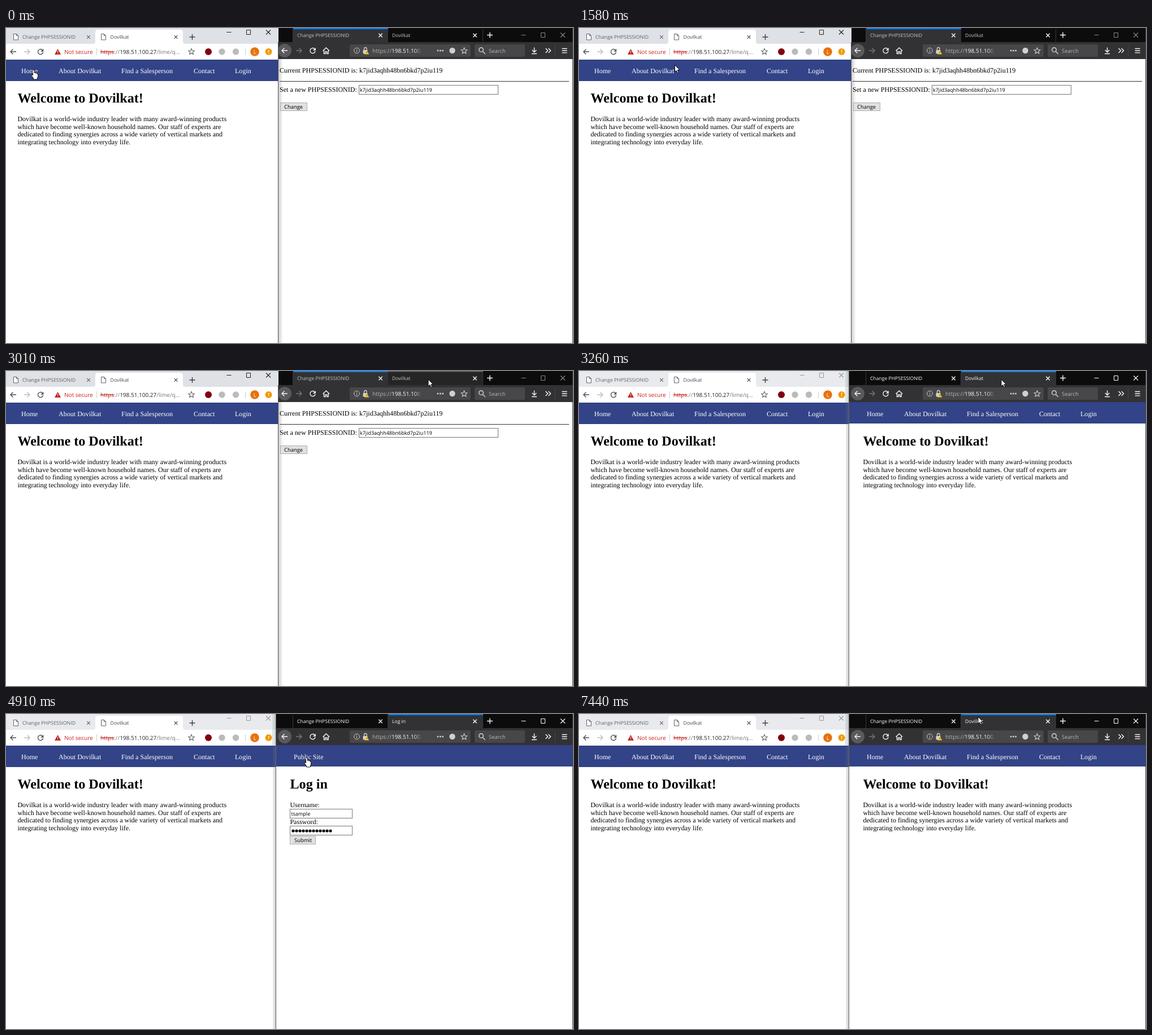
Recreate the animation shown at these times as an HTML page. Size 1003 px wide and 558 px high, loop 8 s.

```html
<!DOCTYPE html>
<html lang="en">
<head>
<meta charset="utf-8">
<title>Two browser windows</title>
<style>
html, body { margin: 0; width: 100%; height: 100%; overflow: hidden; background: #fff; }
svg { display: block; width: 100%; height: 100%; }
text { white-space: pre; text-rendering: geometricPrecision; }
.ui { font-family: "Open Sans", "Noto Sans", sans-serif; }
.serif { font-family: "Liberation Serif", "Times New Roman", serif; }
.sans { font-family: "Liberation Sans", Arial, sans-serif; }
</style>
</head>
<body>
<svg viewBox="0 0 1003 558" xmlns="http://www.w3.org/2000/svg">
  <defs>
    <linearGradient id="shadeR"><stop stop-color="#777" stop-opacity=".4"/><stop offset="1" stop-color="#999" stop-opacity="0"/></linearGradient>
    <linearGradient id="shadeL"><stop stop-color="#777" stop-opacity=".12"/><stop offset="1" stop-color="#666" stop-opacity=".38"/></linearGradient>
    <linearGradient id="fade"><stop stop-color="#474749" stop-opacity="0"/><stop offset="1" stop-color="#474749"/></linearGradient>
  </defs>
  <g id="scene"></g>
  <g id="cursor" fill="#fff" stroke="#000" stroke-width=".9" stroke-linejoin="round">
    <path id="arrow" d="M0 0V12L2.8 9.5 4.8 14 6.7 13.2 4.8 8.8H8.6Z"/>
    <path id="hand" d="M-1.5 1.2Q0-1 1.5 1.2V6Q3 0 3.4 6.4 5 0 5.4 7 7.4 6 7.6 8.4V12L6.4 15V17H-.6V15L-4 10.2Q-4.4 8-2.8 8.6L-1.5 10Z"/>
  </g>
</svg>
<script>
const LOOP = 8000, BRAND = 'Dovilkat', SESSION = 'k7jid3aqhh48bn6bkd7p2iu119';
const TAB = 'Change PHPSESSIONID', BLUE = '#324387';
const $ = id => document.getElementById(id);

// Bursts of screen updates: start, end, number of steps
const BURSTS = [[160, 1120, 8], [1270, 2210, 8], [2360, 2360, 1], [2640, 3680, 9], [3800, 4790, 8],
  [4910, 4910, 1], [5340, 6300, 8], [6690, 7020, 3], [7300, 7440, 2]];

// Cursor path: time, x, y
const PATH = [[0, 49, 74], [159, 49, 74], [570, 404, 76], [846, 408, 77], [970, 330, 80], [1120, 56, 76],
  [1400, 49, 76], [1940, 785, 13], [2210, 746, 13], [2360, 747, 15], [3160, 747, 15], [3680, 885, 70],
  [3800, 897, 76], [3941, 897, 76], [4222, 532, 86], [4365, 532, 85], [4640, 532, 77], [5750, 532, 77],
  [6300, 648, 88], [6690, 668, 78], [6855, 738, 40], [7020, 704, 2], [7300, 704, 2], [7440, 706, 5], [LOOP, 706, 5]];
const HAND = [[0, 290], [570, 965], [1115, 1450], [3800, 4000], [4640, 5800]];

const rect = (x, y, w, h, fill, more = '') => `<rect x="${x}" y="${y}" width="${w}" height="${h}" fill="${fill}" ${more}/>`;
const box = (x, y, w, h, fill, stroke) => rect(x + .5, y + .5, w - 1, h - 1, fill, `stroke="${stroke}"`);
const dot = (x, y, r, fill) => `<circle cx="${x}" cy="${y}" r="${r}" fill="${fill}"/>`;
const line = (d, stroke, w = 1, fill = 'none') => `<path d="${d}" stroke="${stroke}" stroke-width="${w}" fill="${fill}"/>`;
const text = (x, y, s, size, fill = '#000', cls = 'ui', more = '') =>
  `<text x="${x}" y="${y}" font-size="${size}" fill="${fill}" class="${cls}" ${more}>${s}</text>`;
const serif = (x, y, s, fill) => text(x, y, s, 12.06, fill, 'serif');
const heading = (x, s) => text(x, 132, s, 24.12, '#000', 'serif', 'font-weight="700"');

const cross = (x, y, r, c, w = 1.1) => line(`M${x - r} ${y - r}l${2 * r} ${2 * r}m0 ${-2 * r}l${-2 * r} ${2 * r}`, c, w);
const plus = (x, y, c) => line(`M${x - 5} ${y}h10M${x} ${y - 5}v10`, c, 1.4);
const back = (x, y, c) => line(`M${x + 5} ${y}h-10m4.5-4.5l-4.5 4.5 4.5 4.5`, c, 1.4);
const next = (x, y, c) => line(`M${x - 5} ${y}h10m-4.5-4.5l4.5 4.5-4.5 4.5`, c, 1.4);
const reload = (x, y, c) => line(`M${x + 3.2} ${y - 3.2}A4.6 4.6 0 1 0 ${x + 4.6} ${y + 1}`, c, 1.4) +
  `<path d="M${x + 5.3} ${y - 5.3}v5h-5z" fill="${c}"/>`;
const star = (x, y, c) => {
  let d = '';
  for (let i = 0; i < 10; i++) {
    const r = i % 2 ? 2.5 : 5.6, a = i * Math.PI / 5;
    d += `${i ? 'L' : 'M'}${(x + r * Math.sin(a)).toFixed(1)} ${(y - r * Math.cos(a)).toFixed(1)}`;
  }
  return line(d + 'Z', c, 1.1);
};
const sheet = x => line(`M${x} 10.5h5l3 3v7.5h-8zM${x + 5} 10.5v3h3`, '#5f6368', 1, '#fff');
const windowButtons = (x, y, c) => line(`M${x} ${y}h8M${x + 35} ${y - 4}h7v8h-7z`, c) + cross(x + 73.5, y, 4, c);

function homePage(x) {
  const nav = [[27, 'Home'], [93, 'About ' + BRAND], [204, 'Find a Salesperson'], [332, 'Contact'], [405, 'Login']];
  const copy = [BRAND + ' is a world-wide industry leader with many award-winning products',
    'which have become well-known household names. Our staff of experts are',
    'dedicated to finding synergies across a wide variety of vertical markets and',
    'integrating technology into everyday life.'];
  return nav.map(([dx, s]) => serif(x + dx, 80, s, '#fff')).join('') +
    heading(x + 20.5, `Welcome to ${BRAND}!`) +
    copy.map((s, i) => serif(x + 20.4, 165 + Math.round(i * 13.6), s)).join('');
}

function loginPage(x, filled) {
  const left = x + 20, edge = filled ? '#777' : '#a9a9a9';
  let s = serif(x + 27, 80, 'Public Site', '#fff') + heading(left + .5, 'Log in') +
    serif(left + .4, 165, 'Username:') + serif(left + .4, 195, 'Password:');
  if (!filled) return s + box(left, 168, 131, 16, '#fff', edge) + box(left, 197, 131, 16, '#fff', edge) +
    box(left, 213, 44, 16, '#e9e9e9', '#a0a0a0') + text(left + 6.5, 225, 'Submit', 10, '#000', 'sans');
  s += box(left, 168, 111, 17, '#fff', edge) + box(left, 198, 111, 17, '#fff', edge) +
    text(left + 2.5, 180, 'tsample', 9) + box(left, 216, 46, 15, '#e1e1e1', '#adadad') +
    text(left + 8, 227, 'Submit', 9.4);
  for (let i = 0; i < 12; i++) s += dot(left + 6 + i * 6, 207, 2.6, '#000');
  return s;
}

function sessionPage() {
  return serif(484, 79, 'Current PHPSESSIONID is: ' + SESSION) + rect(484, 94, 512, 1, '#333') +
    serif(484, 113, 'Set a new PHPSESSIONID:') + box(624, 101, 247, 17, '#fff', '#777') +
    text(626, 113, SESSION, 9) + box(485, 132, 48, 15, '#e1e1e1', '#adadad') + text(492, 143, 'Change', 9.4);
}

function leftWindow({ login, front }) {
  const dark = '#3c4043', title = login ? 'Log in' : BRAND;
  return rect(0, 0, 482, 558, '#fff') + rect(0, 0, 482, 28, front ? '#e8eaed' : '#dee1e6') +
    `<path d="M154 28q4 0 4-4V8q0-5 5-5h145q5 0 5 5v16q0 4 4 4z" fill="#fff"/>` +
    sheet(13.5) + text(29, 19, TAB, 8.75, '#5f6368') + cross(146, 16, 2.8, '#5f6368') +
    sheet(168.5) + text(184.5, 19, title, 8.75, '#45494d') + cross(300.5, 16, 2.8, dark) +
    plus(329.5, 16, dark) + windowButtons(390.5, 7.5, front ? '#999' : '#222') +
    back(13, 42, '#4a4d51') + next(37, 42, '#bcbec0') + reload(61, 42, '#4a4d51') +
    '<path d="M91.5 37l5.5 10h-11z" fill="#c5221f"/>' + rect(91, 40.5, 1, 3, '#fff') + rect(91, 44.5, 1, 1, '#fff') +
    text(103, 46, 'Not secure', 10.05, '#c5221f') + rect(160, 36, 1, 12, '#ccc') +
    text(167, 46, '<tspan fill="#c5221f" text-decoration="line-through">https</tspan><tspan fill="#777">://</tspan>' +
      '<tspan fill="#202124">198.51.100.27</tspan>/lime/q...', 10, '#777') +
    star(328, 42, '#5f6368') + dot(358, 42, 6, '#800010') + dot(382, 42, 5.7, '#bbb') + dot(406.5, 42, 5.7, '#bbb') +
    rect(423, 36, 1, 12, '#ccc') + dot(440, 42, 7.8, '#e8710a') + text(437.8, 45.5, 'L', 9.5, '#fff') +
    dot(464.5, 42, 6, '#f29900') + rect(464, 38.5, 1.2, 4.2, '#fff') + rect(464, 44, 1.2, 1.3, '#fff') +
    rect(0, 56, 482, 38, BLUE) + (login ? loginPage(0, false) : homePage(0));
}

function rightWindow({ front, rightLogin, loading, busy, hover, chevron }) {
  const x = front ? 478 : 482, bright = '#f9f9fa', icon = '#d0d0d1', tabX = front ? 676 : 508;
  const title = rightLogin ? 'Log in' : BRAND, label = front ? bright : '#c4c4c5';
  let s = rect(x, 0, 1003 - x, 558, '#fff') + rect(x, 0, 1003 - x, 25, '#0c0c0d') + rect(x, 25, 1003 - x, 30, '#323234');
  if (hover) s += rect(676, 0, 168, 25, '#252526') + rect(676, 0, 168, 1.5, '#666');
  s += [507, 675, 843].map(p => rect(p, 2, 1, 23, '#38383a')).join('') +
    rect(tabX, 0, 168, 25, '#323234') + rect(tabX, 0, 168, 2, '#0a84ff') +
    text(515, 16, TAB, 8.6, label) + cross(662.5, 13, 3.2, bright, 1.4) +
    text(loading ? 700 : 683, 16, title, 8.6, label) +
    (loading ? dot(694, 13, 1.4, bright) : '') + cross(829.5, 13, 3.2, bright, 1.4) + plus(856, 12.5, bright) +
    windowButtons(911.5, 12.5, front ? '#fff' : '#8a8a8b');
  // Toolbar
  s += dot(493, 40, 12, '#5a5a5c') + back(493, 40, bright) + next(518, 40, '#777779') +
    (busy ? cross(542.5, 40, 4.4, bright, 1.5) : reload(542.5, 40, bright)) +
    line('M560.5 40.5l5.8-5.5 5.8 5.5M562.5 40v5.5h2.5v-3.5h2.6v3.5h2.5V40', bright, 1.4) +
    rect(608, 29, 214, 22, '#474749', 'rx="2"') +
    line('M620.5 35.2a4.8 4.8 0 1 0 .01 0zM620.5 39.5v3.3M620.5 37v1.2', icon) +
    line('M633.5 39v-2.2a2.3 2.3 0 0 1 4.6 0V39', icon, 1.3) + rect(631.5, 39, 8, 6.5, icon, 'rx="1"') +
    '<path d="M638 39.5l4.2 7h-8.4z" fill="#ffd02b"/>' + rect(637.6, 42, .9, 2.4, '#333') +
    text(648, 44, 'https://<tspan fill="#f9f9fa">198.51.100.2</tspan>', 10, '#b1b1b3') +
    rect(722, 32, 14, 16, 'url(#fade)') + rect(736, 32, 15, 16, '#474749') +
    (chevron ? line('M742.5 38.5l4 4 4-4', '#8f8f91', 1.2) : '') +
    [764, 768.3, 772.6].map(p => dot(p, 40, 1.5, icon)).join('') + dot(789.5, 40, 5.2, icon) + star(810.5, 40.5, icon) +
    rect(829, 29, 89, 22, '#474749', 'rx="2"') + line('M840.5 34.8a3.8 3.8 0 1 0 .01 0zM843.3 41.5l4.5 4.5', icon, 1.4) +
    text(854, 44, 'Search', 9.5, '#b5b5b6') +
    line('M934.5 34.5v8m-3.8-3.6l3.8 3.8 3.8-3.8M930 45.5h9', bright, 1.4) +
    line('M954.5 36l4 4-4 4m5-8l4 4-4 4', bright, 1.4) + rect(971, 30, 1, 20, '#454547') +
    line('M983.5 36.5h9m-9 3.7h9m-9 3.7h9', bright, 1.4);
  if (front) {
    s += rect(478, 55, 525, 38, BLUE) + (rightLogin ? loginPage(482, true) : homePage(482)) +
      rect(472, 0, 6, 558, 'url(#shadeL)') + rect(471, 0, 1, 56, '#b8e4e6') + rect(477, 0, 1, 558, '#666');
  } else {
    s += rect(482, 55, 8, 503, 'url(#shadeR)') + sessionPage() + rect(481, 25, 1, 533, '#555');
  }
  return s + rect(1002, 0, 1, 558, '#444');
}

// Time of the latest screen update
function snap(t) {
  let last = 0;
  for (const [a, b, n] of BURSTS) {
    if (t < a) break;
    const d = (b - a) / (n - 1 || 1);
    last = d ? Math.min(b, a + Math.floor((t - a) / d) * d) : a;
  }
  return last;
}

const within = (t, a, b) => t >= a && t < b;

function pointer(t) {
  const i = Math.max(1, PATH.findIndex(p => p[0] > t));
  const [t0, x0, y0] = PATH[i - 1], [t1, x1, y1] = PATH[i];
  const u = (t - t0) / (t1 - t0), k = u * u * (3 - 2 * u);
  return [x0 + (x1 - x0) * k, y0 + (y1 - y0) * k];
}

let shown = '';
function draw(now) {
  const t = snap(now % LOOP);
  const state = {
    login: within(t, 700, 1400),
    front: t >= 3150,
    rightLogin: within(t, 4500, 5740),
    loading: within(t, 3940, 4500) || within(t, 5470, 6160),
    busy: within(t, 3940, 4900) || within(t, 5470, 6290),
    hover: within(t, 1930, 3150),
    chevron: within(t, 1800, 2070)
  };
  const key = JSON.stringify(state);
  if (key !== shown) {
    $('scene').innerHTML = leftWindow(state) + rightWindow(state);
    shown = key;
  }
  const [x, y] = pointer(t), hand = HAND.some(([a, b]) => within(t, a, b));
  $('cursor').setAttribute('transform', `translate(${x.toFixed(1)} ${y.toFixed(1)})`);
  $('hand').setAttribute('display', hand ? 'inline' : 'none');
  $('arrow').setAttribute('display', hand ? 'none' : 'inline');
}

const start = performance.now();
function tick() {
  draw(performance.now() - start);
  requestAnimationFrame(tick);
}
tick();
</script>
</body>
</html>
```
